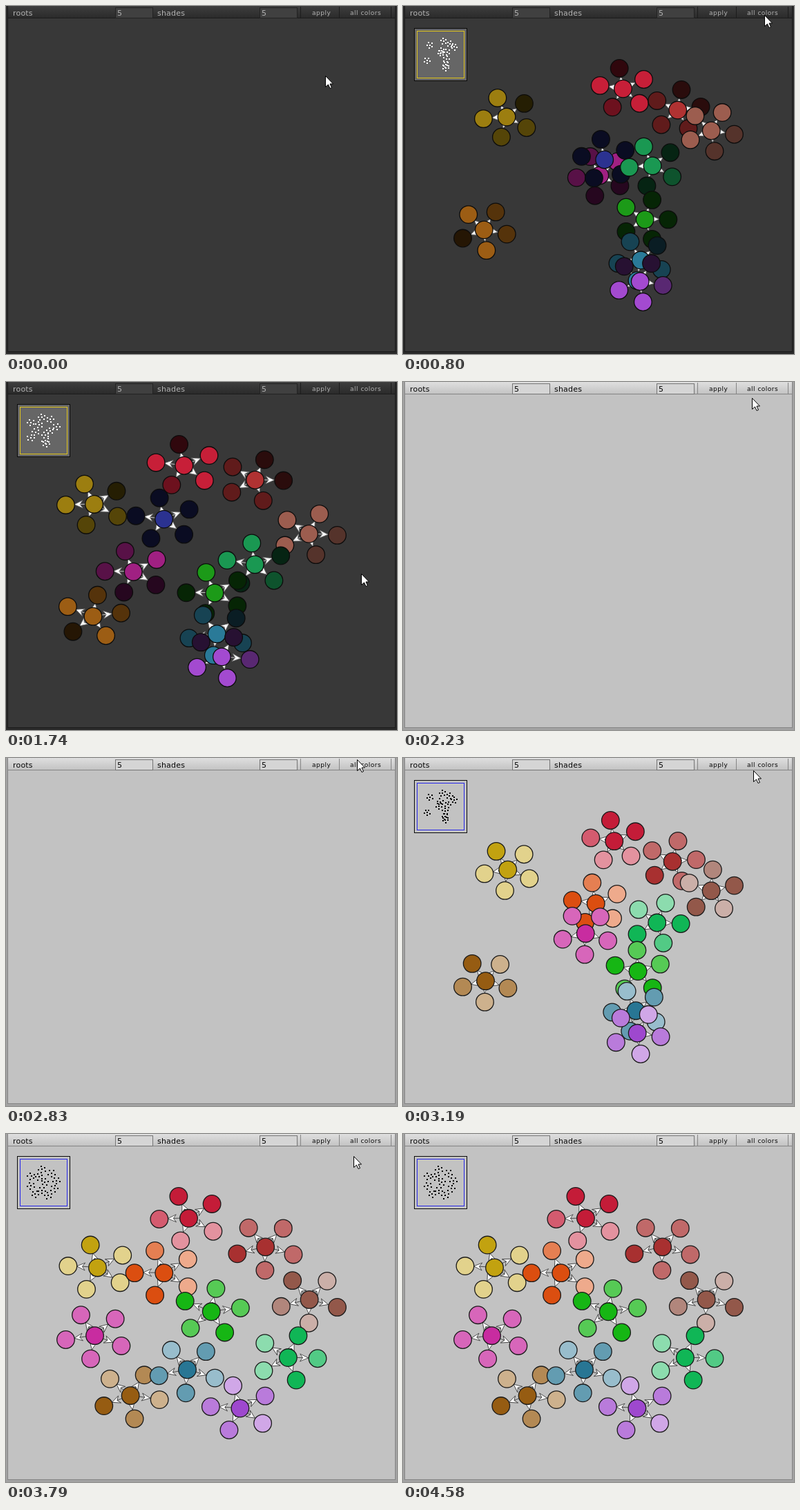
These frames come from a looping animation (566x505 px, 4.7 s). An HTML page with a canvas:

```html
<!DOCTYPE html>
<html lang="en">
<head>
<meta charset="utf-8">
<title>Color graph</title>
<style>
html, body { margin: 0; width: 566px; height: 505px; overflow: hidden; }
canvas { display: block; }
</style>
</head>
<body>
<canvas id="stage" width="566" height="505"></canvas>
<script>
const ctx = document.getElementById('stage').getContext('2d');
const LOOP = 4700;

// The picture advances in bursts of up to five short steps.
const BURSTS = [0, 250, 800, 1400, 1990, 2230, 2830, 3430, 4000, 4580];
const STEP = 117;

// The shades are veil strengths over the cluster color; the radii are those of a star at the start and the end.
const dark = {
  clusters: [], shown: 800, settled: 1268, drift: .06, shades: [0, .45, .76], veil: '#000',
  radius: [[34, 30], [42, 32]],
  frame: '#2a2a2a', line: '#1c1c1c', back: '#383838', bar: ['#3e3e3e', '#2b2b2b'],
  field: '#404040', fieldEdge: '#222', text: '#b4b4b4', edge: '#c8c8c8', headEdge: '#777', ring: '#0c0c0c',
  map: '#666', mapEdge: '#e0c51c', dot: '#fff'
};
const light = {
  clusters: [], shown: 3180, settled: 3780, drift: 0, shades: [0, .28, .52], veil: '#fff',
  radius: [[35, 31], [43, 35]],
  frame: '#a2a2a2', line: '#858585', back: '#c2c2c2', bar: ['#dfdfdf', '#c3c3c3'],
  field: '#d5d5d5', fieldEdge: '#747474', text: '#060606', edge: '#484848', headEdge: '#333', ring: '#1a1a1a',
  map: '#c2c2c2', mapEdge: '#2828ec', dot: '#000'
};

// A root with five children in a star; from and to hold x, y and the turn in degrees.
function cluster(theme, color, levels, from, to) {
  theme.clusters.push({ color, levels: '0' + levels, from, to });
}

cluster(dark, '#c71f38', '01020', [324, 116, 45], [265, 120, 44]);
cluster(dark, '#b03232', '21112', [404, 147, -9], [370, 142, 1]);
cluster(dark, '#9c5d4f', '11000', [453, 177, 10], [449, 220, 4]);
cluster(dark, '#9c7e10', '11002', [154, 157, 31], [129, 177, 34]);
cluster(dark, '#a02082', '22110', [290, 242, 30], [191, 277, 37]);
cluster(dark, '#2b3290', '22222', [297, 219, 45], [235, 201, 45]);
cluster(dark, '#1a9852', '21200', [367, 228, -40], [368, 266, -25]);
cluster(dark, '#1c9a18', '22202', [356, 306, 0], [310, 310, 35]);
cluster(dark, '#9c5d14', '10201', [121, 321, 12], [126, 344, -8]);
cluster(dark, '#2a7a98', '10112', [350, 365, 27], [313, 371, 25]);
cluster(dark, '#a34ad0', '10022', [349, 396, 11], [320, 405, 7]);

cluster(light, '#c41c38', '22100', [311, 115, 45], [265, 114, 34]);
cluster(light, '#a83030', '11011', [397, 145, -5], [377, 157, 19]);
cluster(light, '#93584a', '02102', [454, 188, 130], [441, 236, 19]);
cluster(light, '#c2a210', '22202', [154, 157, 25], [132, 188, 40]);
cluster(light, '#db4e10', '20012', [284, 207, 45], [229, 196, 36]);
cluster(light, '#10b656', '10220', [374, 235, 75], [410, 323, 2]);
cluster(light, '#16b614', '10101', [346, 307, -20], [298, 254, -9]);
cluster(light, '#c82ca0', '11111', [269, 251, 20], [128, 290, 26]);
cluster(light, '#965c12', '21021', [121, 321, 92], [180, 380, 10]);
cluster(light, '#287694', '21121', [343, 365, 32], [263, 341, 21]);
cluster(light, '#9e48ce', '21121', [345, 398, 82], [340, 399, 40]);

// Pointer keys: time, x, y; hidden between the tracks.
const TRACKS = [
  [[0, 462, 101], [245, 462, 101], [700, 520, 4], [800, 523, 13], [1300, 523, 13], [1860, 508, 457], [1989, 508, 457]],
  [[2230, 505, 23], [2690, 508, 0], [2950, 508, 3], [3180, 507, 18], [3310, 507, 18],
    [3780, 503, 32], [3890, 503, 34], [4460, 545, 496], [4579, 545, 496]]
];

const mix = (a, b, k) => a.map((v, i) => v + (b[i] - v) * k);

function pointerAt(t) {
  const track = TRACKS.find(k => t >= k[0][0] && t <= k[k.length - 1][0]);
  if (!track) return null;
  const i = Math.max(1, track.findIndex(k => k[0] >= t));
  const [a, b] = [track[i - 1], track[i]];
  return mix(a, b, (t - a[0]) / (b[0] - a[0])).slice(1).map(Math.round);
}

// Stretches all nodes to the fixed bounds of the view.
function fit(pose) {
  const nodes = pose.flat();
  [[86, 479], [90, 429]].forEach(([lo, hi], axis) => {
    const v = nodes.map(p => p[axis]), min = Math.min(...v), max = Math.max(...v);
    nodes.forEach(p => p[axis] = lo + (p[axis] - min) / (max - min) * (hi - lo));
  });
  return pose;
}

function poseAt(theme, t) {
  const u = (t - theme.shown) / (theme.settled - theme.shown);
  const k = u < 1 ? 1 - (1 - u) ** 1.6 : 1 + theme.drift * Math.min(1, u - 1);
  const [rx, ry] = mix(...theme.radius, k);
  return fit(theme.clusters.map(c => {
    const [x, y, turn] = mix(c.from, c.to, k);
    const nodes = [[x, y]];
    for (let i = 0; i < 5; i++) {
      const a = (turn + 72 * i) * Math.PI / 180;
      nodes.push([x + rx * Math.cos(a), y + ry * Math.sin(a)]);
    }
    return nodes;
  }));
}

function rect(color, x, y, w, h) {
  ctx.fillStyle = color;
  ctx.fillRect(x, y, w, h);
}

function polygon(points) {
  ctx.beginPath();
  points.forEach(p => ctx.lineTo(...p));
  ctx.closePath();
  ctx.fill();
  ctx.stroke();
}

function label(text, x, y, size, spacing) {
  ctx.font = `${size}px "DejaVu Sans", sans-serif`;
  ctx.letterSpacing = spacing + 'px';
  ctx.fillText(text, x, y);
}

function drawWindow(c) {
  rect(c.frame, 0, 0, 566, 505);
  rect(c.line, 2, 0, 562, 502);
  rect(c.back, 3, 0, 560, 501);
  const bar = ctx.createLinearGradient(0, 0, 0, 17);
  c.bar.forEach((color, i) => bar.addColorStop(i, color));
  rect(bar, 3, 0, 560, 17);
  rect(c.line, 3, 17, 560, 1);
  for (const x of [158, 367]) {
    rect(c.fieldEdge, x, 2, 55, 16);
    rect(c.field, x + 1, 3, 53, 14);
  }
  for (const x of [426, 482, 557]) rect(c.line, x, 1, 1, 16);
  ctx.fillStyle = c.text;
  label('roots', 10, 14, 11, .2);
  label('5', 161, 14, 11, .2);
  label('shades', 219, 14, 11, .2);
  label('5', 370, 14, 11, .2);
  label('apply', 443, 13, 9, .5);
  label('all colors', 498, 13, 9, .5);
}

function drawArrow(c, [x1, y1], [x2, y2]) {
  ctx.strokeStyle = c.edge;
  ctx.lineWidth = 1;
  ctx.beginPath();
  ctx.moveTo(x1, y1);
  ctx.lineTo(x2, y2);
  ctx.stroke();
  ctx.save();
  ctx.translate(x2, y2);
  ctx.rotate(Math.atan2(y2 - y1, x2 - x1));
  ctx.fillStyle = '#fff';
  ctx.strokeStyle = c.headEdge;
  ctx.lineWidth = .8;
  polygon([[-13, 0], [-25, -5.5], [-21, 0], [-25, 5.5]]);
  ctx.restore();
}

function drawNode(c, [x, y], color, veil) {
  ctx.beginPath();
  ctx.arc(x + .5, y + .5, 12.8, 0, 2 * Math.PI);
  ctx.fillStyle = color;
  ctx.fill();
  ctx.globalAlpha = veil;
  ctx.fillStyle = c.veil;
  ctx.fill();
  ctx.globalAlpha = 1;
  ctx.strokeStyle = c.ring;
  ctx.lineWidth = 1.3;
  ctx.stroke();
}

function drawMap(c, nodes) {
  rect('#0a0a0a', 16, 32, 77, 77);
  rect(c.map, 17, 33, 75, 75);
  ctx.strokeStyle = c.mapEdge;
  ctx.lineWidth = 1;
  ctx.strokeRect(20.5, 36.5, 68, 68);
  for (const [x, y] of nodes)
    rect(c.dot, Math.round(30 + (x - 86) * .12), Math.round(46 + (y - 90) * .138), 2, 2);
}

function drawGraph(c, pose) {
  for (const [root, ...kids] of pose) kids.forEach(k => drawArrow(c, root, k));
  pose.forEach((nodes, g) => {
    const { color, levels } = c.clusters[g];
    // The root comes last, on top of its children.
    for (let i = 5; i >= 0; i--) drawNode(c, nodes[i], color, c.shades[levels[i]]);
  });
  drawMap(c, pose.flat());
}

function drawPointer([x, y]) {
  ctx.save();
  ctx.translate(x + .5, y + .5);
  ctx.fillStyle = '#fff';
  ctx.strokeStyle = '#000';
  ctx.lineWidth = 1;
  polygon([[0, 0], [0, 16], [4, 12.5], [6.5, 18], [9, 17], [6.5, 11.5], [11, 11.5]]);
  ctx.restore();
}

function draw(now) {
  const time = now % LOOP;
  const burst = BURSTS.filter(b => b <= time).pop();
  const t = burst + STEP * Math.min(4, Math.floor((time - burst) / STEP));
  const theme = t < 2230 ? dark : light;
  drawWindow(theme);
  if (t >= theme.shown) drawGraph(theme, poseAt(theme, t));
  const pointer = pointerAt(t);
  if (pointer) drawPointer(pointer);
}

const begin = performance.now();
function tick() {
  draw(performance.now() - begin);
  requestAnimationFrame(tick);
}
tick();
</script>
</body>
</html>
```
